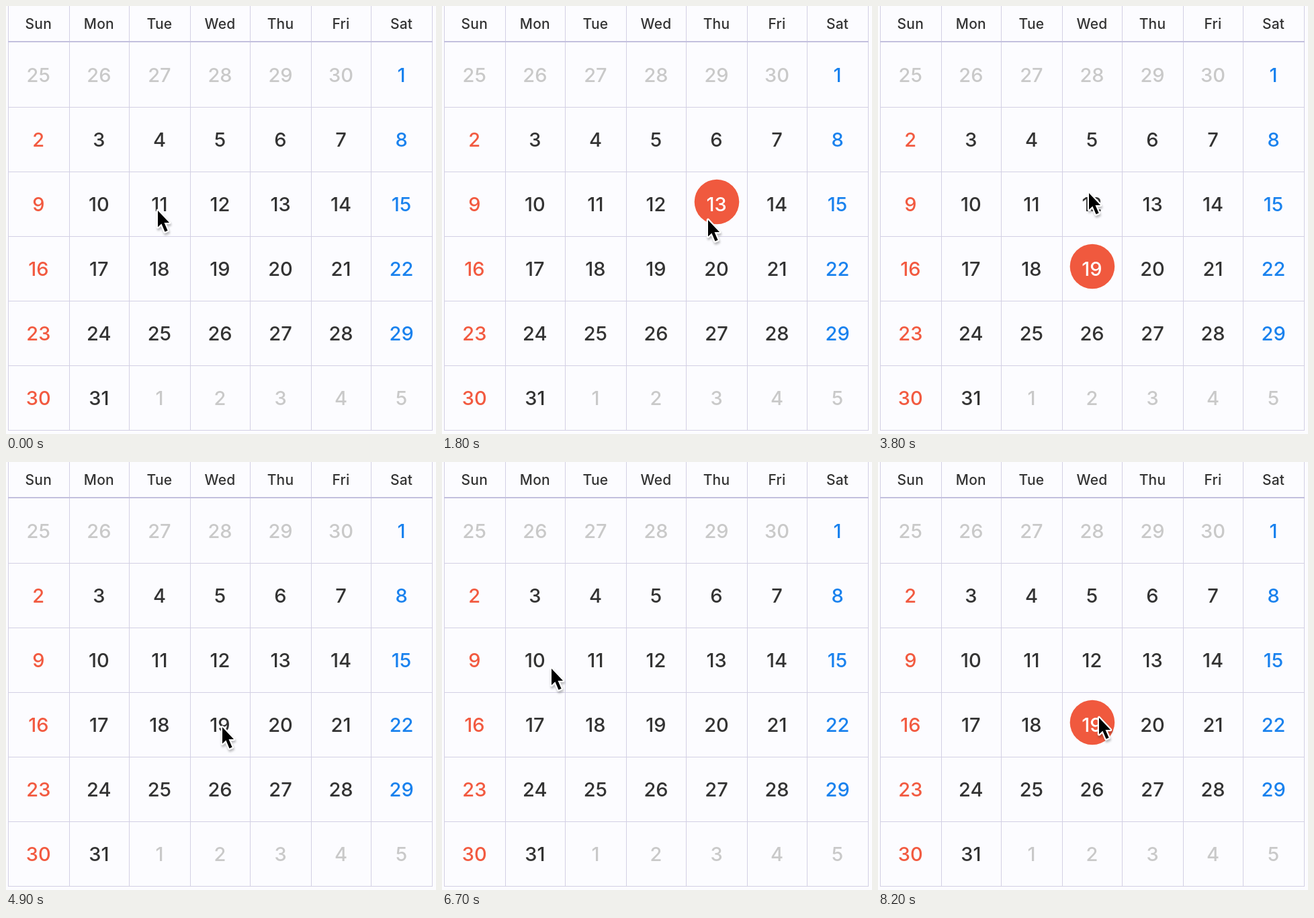
An HTML page that plays this animation: 640x636 px, repeating every 8300 ms.

```html
<!DOCTYPE html>
<html lang="en">
<head>
<meta charset="utf-8">
<title>Calendar</title>
<style>
  html, body { margin: 0; width: 100%; height: 100%; overflow: hidden; background: #fcfcff; }
  svg { display: block; width: 640px; height: 636px; }
  text { font: 500 29px Inter, "Noto Sans", sans-serif; text-anchor: middle; fill: #333; }
  .head { font-size: 21px; letter-spacing: .2px; }
  .out { fill: #c9c9c9; }
  .sun { fill: #f25a40; }
  .sat { fill: #1a82ee; }
  .on { fill: #fff; }
  .line { stroke: #d3d0e4; stroke-width: 1; }
  .rule { stroke: #c3c0de; stroke-width: 2; }
  #dot { fill: #f0593e; }
  #arrow { filter: drop-shadow(1px 3px 1.5px rgba(0, 0, 0, .25)); }
  #arrow path { fill: #000; stroke: #fff; stroke-width: 4.5; stroke-linejoin: round; paint-order: stroke; }
</style>
</head>
<body>
<svg viewBox="0 0 640 636">
  <g id="grid"></g>
  <circle id="dot" r="33.3"/>
  <g id="days"></g>
  <g id="arrow"><path d="M0 0V24.5L5.4 19.6L10.5 31.5L14.6 29.7L9.5 18H17Z"/></g>
</svg>
<script>
const LOOP = 8300, STEP = 100, TRAVEL = 800;
const $ = id => document.getElementById(id);

function add(parent, tag, attrs, text = "") {
  const el = document.createElementNS("http://www.w3.org/2000/svg", tag);
  for (const k in attrs) el.setAttribute(k, attrs[k]);
  el.textContent = text;
  parent.append(el);
  return el;
}
const line = (x1, y1, x2, y2, cls = "line") => add($("grid"), "line", { x1, y1, x2, y2, class: cls });
const label = (x, y, cls, text) => add($("days"), "text", { x, y, class: cls }, text);
const colX = c => 48.3 + 90.05 * c;
const rowY = r => 102 + 96 * r;

for (let c = 0; c < 8; c++) {
  const x = 3.5 + 90 * c + c % 2;
  line(x, 0, x, 630);
}
for (let r = 0; r < 6; r++) line(3, rowY(r) + 48.5, 635, rowY(r) + 48.5);
line(3, 53, 635, 53, "rule");

"Sun Mon Tue Wed Thu Fri Sat".split(" ").forEach((name, c) => label(colX(c), 34, "head", name));

// The month starts on a Saturday, after a month of 30 days
const cells = {};
for (let i = 0; i < 42; i++) {
  const c = i % 7, r = Math.floor(i / 7), n = i - 5;
  const inMonth = n > 0 && n < 32;
  const cls = !inMonth ? "out" : c === 0 ? "sun" : c === 6 ? "sat" : "day";
  const el = label(colX(c), rowY(r) + 11, cls, n < 1 ? n + 30 : n > 31 ? n - 31 : n);
  if (inMonth) cells[n] = { el, x: colX(c) + .5, y: rowY(r) - 3 };
}

// Pointer stops: arrival time, tip, day clicked there
const stops = [
  { t: 0, x: 226, y: 304 },
  { t: 1200, x: 396, y: 318, click: 13 },
  { t: 2600, x: 316, y: 216, click: 5 },
  { t: 3400, x: 322, y: 394, click: 19 },
  { t: 3800, x: 314, y: 278 },
  { t: 4500, x: 322, y: 394, click: 19 },
  { t: 6000, x: 163, y: 307 },
  { t: 7500, x: 428, y: 297 },
  { t: 8000, x: 329, y: 380, click: 19 }
];

const ease = p => p * p * (3 - 2 * p);

function pointerAt(t) {
  const i = stops.findLastIndex(s => s.t <= t);
  const a = stops[i], b = stops[i + 1] || a;
  const span = Math.min(TRAVEL, b.t - a.t) || 1;
  const p = ease(Math.max(0, 1 - (b.t - t) / span));
  return b === a ? a : { x: a.x + (b.x - a.x) * p, y: a.y + (b.y - a.y) * p };
}

// A second click on the selected day clears it
const selectedAt = t => stops
  .filter(s => s.click && s.t <= t)
  .reduce((day, s) => day === s.click ? 0 : s.click, 0);

function draw(now) {
  const t = Math.floor((now % LOOP) / STEP) * STEP;
  const { x, y } = pointerAt(t);
  $("arrow").setAttribute("transform", `translate(${x} ${y})`);
  const day = selectedAt(t);
  for (const n in cells) cells[n].el.classList.toggle("on", +n === day);
  $("dot").style.display = day ? "" : "none";
  if (day) {
    $("dot").setAttribute("cx", cells[day].x);
    $("dot").setAttribute("cy", cells[day].y);
  }
}

const start = performance.now();
function tick() {
  draw(performance.now() - start);
  requestAnimationFrame(tick);
}
tick();
</script>
</body>
</html>
```
